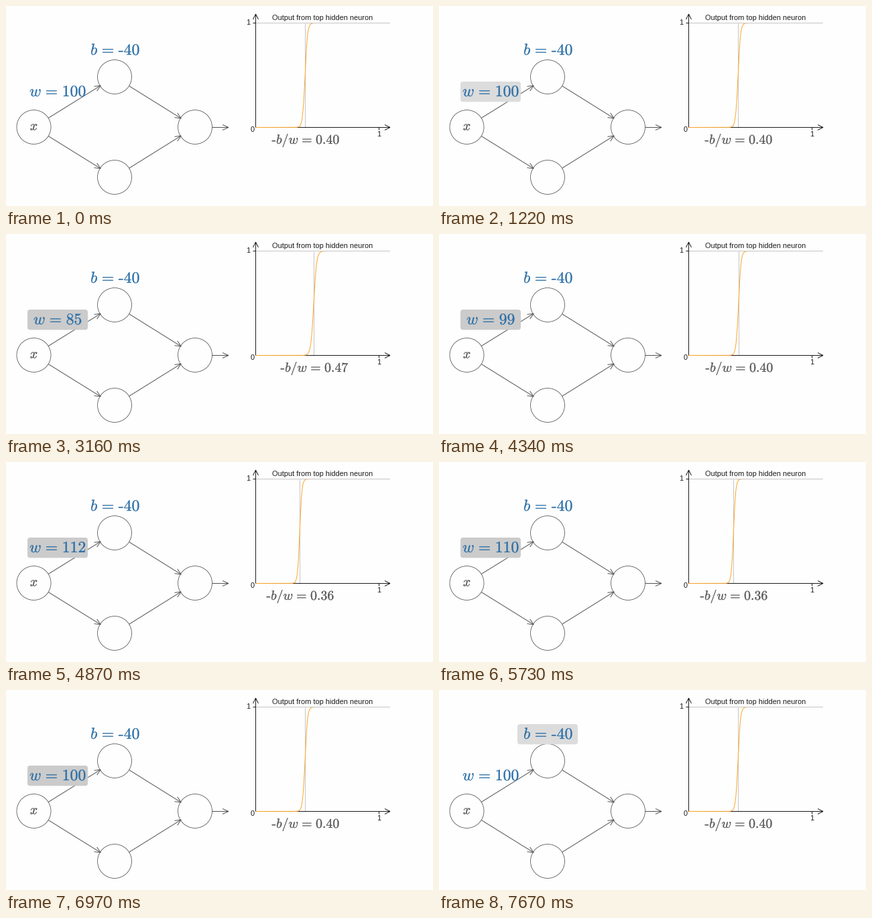
Recreate the animation shown at these times as a matplotlib script. Size 637 by 299 pixels, loop 8000 ms.

```python
import math

import numpy as np
import matplotlib.pyplot as plt
from matplotlib.animation import FuncAnimation
from matplotlib.patches import Circle, FancyBboxPatch, PathPatch
from matplotlib.path import Path
from matplotlib.textpath import TextPath

W, H, DPI = 637, 299, 64
PX = 72 / DPI                      # points per pixel
LOOP, STEP = 8000, 20              # ms

BLUE, GREY, ORANGE = "#2a6ea6", "#555555", "#ffa62b"
DARK, RULE, HOVER, PRESSED = "#1c1c1c", "#c6c6c6", "#dcdcdc", "#cbcbcb"
BIAS = -40
X0, Y0, XS, YS = 372.5, 181.5, 184, 156   # plot origin and unit lengths

# start, end, number of steps, weight before, weight after
DRAGS = [
    (2380, 3160, 11, 100, 85),
    (3790, 3860, 2, 85, 88),
    (4030, 4340, 5, 88, 99),
    (4410, 4800, 6, 99, 111),
    (4870, 4871, 1, 111, 112),
    (5040, 5041, 1, 112, 113),
    (5270, 5271, 1, 113, 112),
    (5650, 6110, 7, 112, 105),
    (6340, 6341, 1, 105, 104),
    (6510, 6511, 1, 104, 103),
    (6660, 6661, 1, 103, 102),
    (6890, 6970, 2, 102, 100),
]

# time, highlighted label, colour
HIGHLIGHTS = [
    (0, None, HOVER),
    (910, "b", HOVER),
    (1140, None, HOVER),
    (1220, "w", HOVER),
    (2080, "w", PRESSED),
    (7520, "w", HOVER),
    (7600, None, HOVER),
    (7670, "b", HOVER),
]

# advance widths in em; the relation sign includes its side spaces
EM = {"b": 0.429, "w": 0.716, "x": 0.572, "/": 0.5, "=": 1.333,
      "-": 0.333, ".": 0.278}
BIG, SMALL = 23.7, 19.8            # formula sizes in pixels

plt.rcParams["mathtext.fontset"] = "cm"
plt.rcParams["font.family"] = ["Liberation Sans", "DejaVu Sans"]

glyphs = {}


def glyph(c):
    """Outline of one math character at size 1, baseline at y = 0."""
    if c not in glyphs:
        if c == "-":
            box = [(.011, .187), (.276, .187), (.276, .25), (.011, .25), (0, 0)]
            path = Path(box, closed=True)
        else:
            shape = TextPath((0, 0), f"${c}$", size=100)
            verts = shape.vertices / 100
            if c == "=":
                ext = shape.get_extents()
                verts = verts + [EM[c] / 2 - (ext.x0 + ext.x1) / 200, 0]
            path = Path(verts, shape.codes)
        glyphs[c] = path
    return glyphs[c]


def width(s, size):
    return size * sum(EM.get(c, 0.5) for c in s)


def formula(s, left, base, size):
    parts = []
    for c in s:
        g = glyph(c)
        parts.append(Path(g.vertices * [size, -size] + [left, base], g.codes))
        left += width(c, size)
    return Path.make_compound_path(*parts)


def centred(s, mid, base, size):
    return formula(s, mid - width(s, size) / 2, base, size)


def weight_label(w):
    return centred(f"w={w}", 77.2, 135, BIG)


def ratio_label(r):
    return formula(f"-b/w={r:.2f}", 323.5 + math.floor(r * XS), 206, SMALL)


def ink(path, color):
    return ax.add_patch(PathPatch(path, fc=color, ec=color, lw=0.35 * PX, zorder=5))


def line(xs, ys, color=GREY, z=2, snap=False):
    return ax.plot(xs, ys, color=color, lw=PX, zorder=z, snap=snap,
                   solid_capstyle="butt", solid_joinstyle="miter")[0]


def arrow(a, b, color=GREY, head=(9, 4), z=2):
    a, b = np.array(a, float), np.array(b, float)
    u = (b - a) / np.hypot(*(b - a))
    n = np.array([-u[1], u[0]])
    line(*zip(a, b), color, z)
    back = b - head[0] * u
    line(*zip(back + head[1] * n, b, back - head[1] * n), color, z)


def label(x, y, s):
    ax.text(x, y, s, size=11 * PX, color=DARK, ha="center", va="baseline", zorder=4)


fig = plt.figure(figsize=(W / DPI, H / DPI), dpi=DPI, facecolor="#fefefe")
ax = fig.add_axes([0, 0, 1, 1])
ax.set_xlim(0, W)
ax.set_ylim(H, 0)
ax.axis("off")

# network
R = 25.5
nodes = {"in": (41.5, 181), "top": (162, 106), "bottom": (162, 256), "out": (282, 181)}
for pos in nodes.values():
    ax.add_patch(Circle(pos, R, fill=False, ec=GREY, lw=0.8 * PX, zorder=2))
for a, b in [("in", "top"), ("in", "bottom"), ("top", "out"), ("bottom", "out")]:
    p, q = np.array(nodes[a]), np.array(nodes[b])
    u = (q - p) / np.hypot(*(q - p))
    arrow(p + R * u, q - (R - 1) * u)
arrow((307.5, 181.5), (332, 181.5))
ink(centred("x", 41.5, 185.5, SMALL), GREY)

# highlight boxes and labels
boxes = {}
for name, (x, y) in {"w": (32, 113), "b": (117, 51)}.items():
    boxes[name] = ax.add_patch(FancyBboxPatch(
        (x, y), 90, 30.3, boxstyle="round,pad=0,rounding_size=4",
        fc=HOVER, ec="none", visible=False, zorder=3))
ink(centred(f"b={BIAS}", 162.7, 73, BIG), BLUE)
w_text = ink(weight_label(100), BLUE)

# plot: the curve covers the x axis but passes under the upper rule
arrow((X0, Y0), (X0, 12), DARK, (8, 4), z=2)
arrow((X0, Y0), (573, Y0), DARK, (8, 4), z=2)
line([368.5, X0], [Y0 - YS] * 2, DARK, z=4)
line([X0 + XS] * 2, [Y0, Y0 + 4], DARK, z=4)
curve = line([], [], ORANGE, z=3)
bar = line([], [], RULE, z=1, snap=None)
line([X0 + 0.5, 572.5], [Y0 - YS] * 2, RULE, z=4)
label(472, 21, "Output from top hidden neuron")
label(361.5, 28.5, "1")
label(367.5, 188, "0")
label(556.5, 195, "1")
ratio_text = ink(ratio_label(0.4), GREY)

grid = np.linspace(0, 200 / XS, 900)


def weight(t):
    w = 100
    for t0, t1, n, a, b in DRAGS:
        if t >= t0:
            k = min(n, 1 + int((t - t0) * (n - 1) / (t1 - t0)))
            w = round(a + (b - a) * k / n)
    return w


def draw(i):
    t = i * STEP + STEP / 2
    w = weight(t)
    ratio = -BIAS / w

    _, active, color = [h for h in HIGHLIGHTS if h[0] <= t][-1]
    for name, box in boxes.items():
        box.set_visible(name == active)
        box.set_facecolor(color)

    w_text.set_path(weight_label(w))
    ratio_text.set_path(ratio_label(ratio))

    curve.set_data(X0 + XS * grid, Y0 - YS / (1 + np.exp(-(w * grid + BIAS))))
    x = X0 + XS * ratio
    bar.set_data([x, x], [Y0 - YS, Y0])
    return [*boxes.values(), w_text, ratio_text, curve, bar]


anim = FuncAnimation(fig, draw, frames=LOOP // STEP, interval=STEP,
                     repeat=True, repeat_delay=0, blit=False)
plt.show()
```
